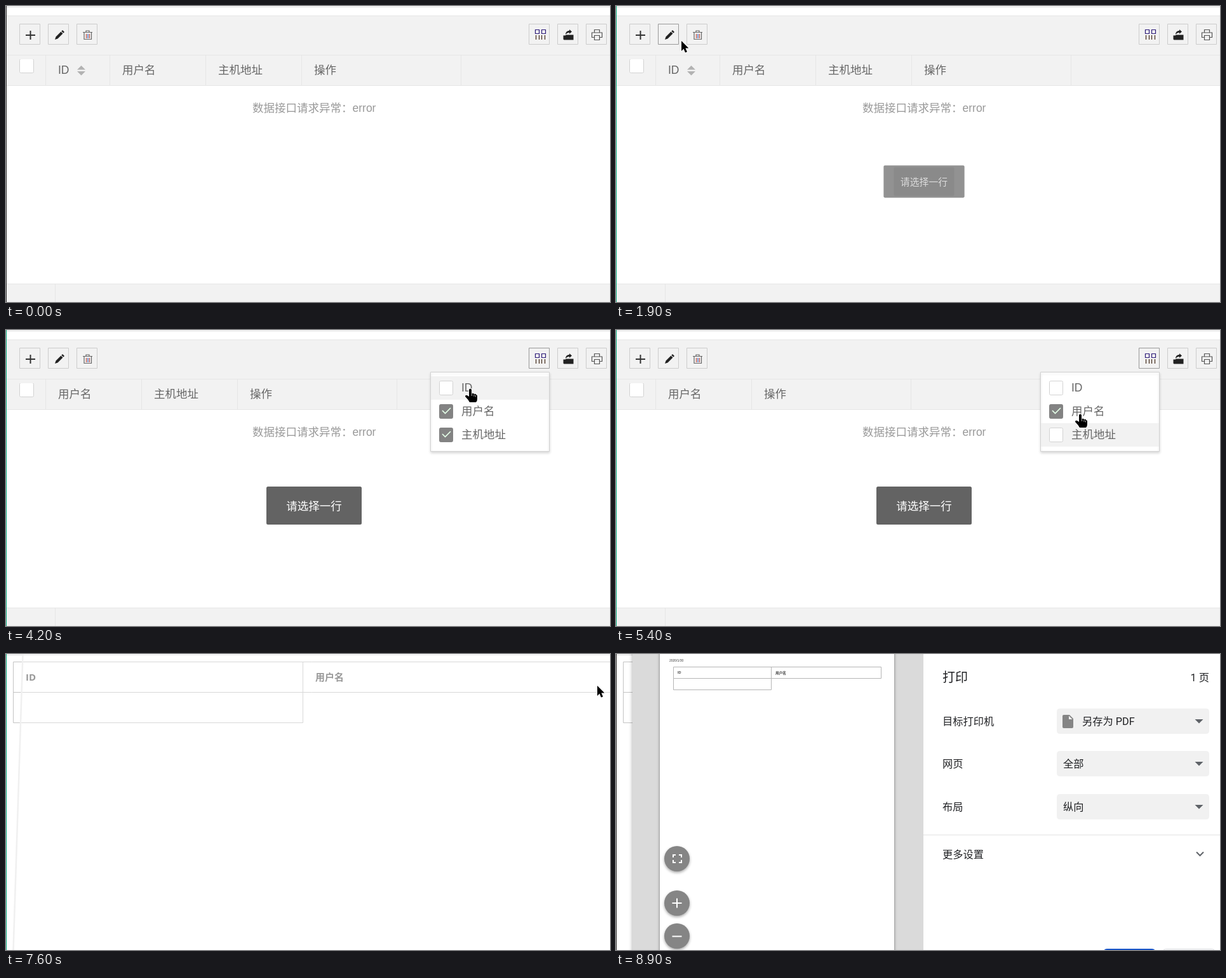
Recreate the animation shown at these times as an HTML page with a canvas. Size 951 by 467 pixels, loop 9.6 s.

```html
<!DOCTYPE html>
<html lang="zh-CN">
<head>
<meta charset="utf-8">
<style>
html, body { margin: 0; width: 100%; height: 100%; overflow: hidden; background: #fff; }
canvas { display: block; }
</style>
</head>
<body>
<canvas id="stage" width="951" height="467"></canvas>
<script>
const ctx = document.getElementById('stage').getContext('2d');
const LOOP = 9600, STEP = 100;
const TABLE_FONT = '"Liberation Sans", "Noto Sans CJK SC", "Noto Sans CJK", sans-serif';
const DIALOG_FONT = 'Roboto, "Noto Sans CJK SC", "Noto Sans CJK", sans-serif';
const clamp = v => Math.min(1, Math.max(0, v));

function rect(x, y, w, h, color) {
  ctx.fillStyle = color;
  ctx.fillRect(x, y, w, h);
}
function box(x, y, w, h, fill, border, r = 0) {
  ctx.beginPath();
  ctx.roundRect(x + .5, y + .5, w - 1, h - 1, r);
  ctx.fillStyle = fill;
  ctx.fill();
  ctx.strokeStyle = border;
  ctx.lineWidth = 1;
  ctx.stroke();
}
function text(s, x, y, color, size = 17.5, { family = TABLE_FONT, weight = 400, align = 'left' } = {}) {
  ctx.font = `${weight} ${size}px ${family}`;
  ctx.textAlign = align;
  ctx.fillStyle = color;
  ctx.fillText(s, x, y);
}
function stroke(d, color, width = 1) {
  ctx.strokeStyle = color;
  ctx.lineWidth = width;
  ctx.stroke(new Path2D(d));
}
function fill(d, color) {
  ctx.fillStyle = color;
  ctx.fill(new Path2D(d));
}
function layer(alpha, draw) {
  ctx.save();
  ctx.globalAlpha = alpha;
  draw();
  ctx.restore();
}
function shadow(color, blur, y, draw) {
  ctx.save();
  Object.assign(ctx, { shadowColor: color, shadowBlur: blur, shadowOffsetY: y });
  draw();
  ctx.restore();
}

// Pointer: time, x, y
const path = [
  [200, 456, 300], [1100, 38, 45], [1500, 38, 48], [1700, 83, 48], [1800, 86, 50],
  [1900, 103, 55], [2100, 117, 54], [2200, 121, 53], [2500, 121, 53], [3100, 835, 48],
  [3200, 835, 47], [3400, 835, 47], [3900, 731, 92], [4400, 731, 92], [4700, 731, 160],
  [5300, 731, 160], [5400, 731, 132], [5700, 731, 92], [5900, 731, 92], [6300, 888, 40],
  [6900, 888, 40], [7200, 931, 50]
];
function pointerAt(t) {
  const i = path.findIndex(k => k[0] > t);
  if (i < 0) return path[path.length - 1].slice(1);
  if (i === 0) return [-99, -99];
  const [t0, x0, y0] = path[i - 1], [t1, x1, y1] = path[i];
  const p = (t - t0) / (t1 - t0), e = p * p * (3 - 2 * p);
  return [x0 + (x1 - x0) * e, y0 + (y1 - y0) * e];
}

const menuOpen = t => t >= 3200 && t < 6200;
const columns = [
  { name: 'ID', width: 101, shown: t => t < 4200 || t >= 5800 },
  { name: '用户名', width: 151, shown: () => true },
  { name: '主机地址', width: 151, shown: t => t < 4700 },
  { name: '操作', width: 251, shown: () => true }
];
const buttons = [21, 66, 111, 823, 868, 913];
const buttonAt = ([x, y]) => buttons.findIndex(b => x >= b && x < b + 33 && y >= 28 && y < 61);
const rowAt = ([x, y]) => x > 668 && x < 856 && y >= 73 && y < 184 ? Math.floor((y - 73) / 37) : -1;

function icons() {
  stroke('M38.5 39v14M31 46h15', '#333', 2);
  fill('M77 53l1.5-4.5 8-8 3 3-8 8zM87.3 39.7l1.7-1.7 3 3-1.7 1.7z', '#222');
  stroke('M121 41.5h15M126 41v-2h5v2M123 42v10.5h11.500V42', '#666', 1.2);
  stroke('M126.500 44v7M131.500 44v7', '#c0503c', 1.2);
  stroke('M129 44v7', '#3060c0', 1.2);
  stroke('M833.5 37.5h6v6h-6zM843.5 37.5h6v6h-6z', '#2c1a78', 1.2);
  stroke('M834.5 46v7M839.5 46v7M843.500 46v7M848.500 46v7', '#4a3424', 1.3);
  fill('M877.500 52.500v-6h3l1.5-1h11.500v8h-15z', '#222');
  fill('M881 45c0-4 3-6 6-6v-2l4 3.500-4 3.500v-2c-3 0-4 1-6 3z', '#222');
  stroke('M926.5 42v-4.5h8v4.5M926 49.500h-3.5v-7.500h16v7.500H935M926.5 46.5h8v7h-8z', '#555', 1.2);
}

function table(t) {
  const before = pointerAt(t - STEP), hover = buttonAt(before);
  rect(1, 15, 950, 111, '#f2f2f2');
  rect(1, 438, 950, 29, '#f2f2f2');
  for (const y of [15, 77, 125, 438]) rect(1, y, 950, 1, '#e6e6e6');
  rect(77, 438, 1, 29, '#e6e6e6');
  buttons.forEach((x, i) => {
    const active = i === hover || (i === 3 && menuOpen(t));
    box(x, 28, 33, 33, '#f2f2f2', active ? '#999' : '#ccc');
  });
  icons();

  ctx.save();
  ctx.beginPath();
  ctx.rect(20, 84, 26, 30);
  ctx.clip();
  box(21, 83, 23, 23, '#fff', '#d2d2d2', 2);
  ctx.restore();

  let x = 62;
  rect(x, 78, 1, 47, '#e6e6e6');
  for (const { name, width, shown } of columns) {
    if (!shown(t)) continue;
    text(name, x + 20, 107, '#666');
    if (name === 'ID') fill(`M${x + 50} 100.500h13l-6.500-6.500zM${x + 50} 103h13l-6.500 6.500z`, '#b2b2b2');
    x += width;
    rect(x, 78, 1, 47, '#e6e6e6');
  }
  text('数据接口请求异常：error', 388, 167, '#999');
  if (menuOpen(t)) menu(t, rowAt(before));
}

function menu(t, hoverRow) {
  shadow('rgba(0,0,0,.14)', 4, 2, () => box(668, 66, 188, 126, '#fff', '#d2d2d2'));
  columns.slice(0, 3).forEach(({ name, shown }, i) => {
    const y = 73 + i * 37;
    if (i === hoverRow) rect(669, y, 186, 37, '#f2f2f2');
    if (shown(t)) {
      box(682, y + 7, 22, 23, '#838383', '#838383', 2);
      stroke(`M687 ${y + 17}l4.500 4.500 8.500-8.500`, '#e4ffe8', 1.7);
    } else box(682, y + 7, 22, 23, '#fff', '#d2d2d2', 2);
    text(name, 717, y + 24, '#666');
  });
}

const toasts = [
  { start: 1250, end: 1740, label: '添加', width: 125 },
  { start: 1765, end: 2500, label: '请选择一行', width: 150 },
  { start: 2520, end: 5560, label: '请选择一行', width: 150 }
];
function toast({ start, end, label, width }, t) {
  if (t < start || t > end + 200) return;
  const grow = 1 - (1 - clamp((t - start) / 300)) ** 2;
  const leave = clamp((t - end) / 200);
  const scale = (.5 + .5 * grow) * (1 - .3 * leave);
  layer(grow * (1 - leave) ** 1.5, () => {
    ctx.translate(485, 277);
    ctx.scale(scale, scale);
    ctx.beginPath();
    ctx.roundRect(-width / 2, -30, width, 60, 2.5);
    ctx.fillStyle = 'rgba(0,0,0,.61)';
    ctx.fill();
    text(label, 0, 6.5, '#fff', 17.5, { align: 'center' });
  });
}

function printPage() {
  stroke('M951 12.5H11.5v96h456v-96M11.5 60.5H951', '#c4c4c4');
  const bold = { weight: 700, family: DIALOG_FONT.replace('Roboto', '"Open Sans"') };
  text('ID', 31, 42, '#666', 15, bold);
  text('用户名', 487, 42, '#666', 15, bold);
}

function preview(t) {
  const step = (t - 8600) / 300;
  if (step <= 0) {
    if (t >= 8000) text('正在加载预览…', 255, 240, '#5f6368', 16.25, { family: DIALOG_FONT, align: 'center' });
    return;
  }
  layer(clamp(step), () => {
    shadow('rgba(0,0,0,.5)', 4, 0, () => rect(69, -5, 369, 480, '#fff'));
    text('2020/1/30', 84, 12, '#333', 5);
    stroke('M90.5 20.5h327v18h-327zM244.5 20.5v36h-154v-18', '#b5b5b5');
    text('ID', 97, 31, '#444', 5.5, { weight: 700 });
    text('用户名', 251, 31.5, '#444', 5.7, { weight: 700 });
  });
  layer(clamp(step) ** 1.8, () => {
    for (const y of [323, 393, 445]) {
      shadow('rgba(0,0,0,.35)', 4, 2, () => {
        ctx.beginPath();
        ctx.arc(96, y, 20, 0, 7);
        ctx.fillStyle = '#858585';
        ctx.fill();
      });
    }
    stroke('M90 321v-4h4M99 317h4v4M103 325v4h-4M94 329h-4v-4M88.500 393h15M96 385.500v15M88.500 445.500h15', '#fff', 2);
  });
}

function settings(t) {
  const ink = '#202124';
  const say = (s, x, y, size = 16.25, align = 'left') => text(s, x, y, ink, size, { family: DIALOG_FONT, align });
  say('打印', 514, 44, 20);
  say('1 页', 934, 43, 16.25, 'right');
  [['目标打印机', '另存为 PDF', 86], ['网页', '全部', 153], ['布局', '纵向', 221]].forEach(([label, value, y], i) => {
    say(label, 514, y + 25.5);
    box(694, y, 240, 40, '#f1f1f1', '#f1f1f1', 4);
    say(value, i ? 704 : 734, y + 26);
    fill(`M911.500 ${y + 17}h13l-6.500 6.500z`, '#5f6368');
  });
  fill('M705 96h9l6 6v13q0 2-2 2h-13q-2 0-2-2v-17q0-2 2-2z', '#858585');
  fill('M713 97.500v5.500h5.500z', '#f1f1f1');
  rect(484, 285, 467, 1, '#e3e3e3');
  say('更多设置', 514, 322);
  stroke('M914 312.500l5.500 5.500 5.500-5.500', '#5f6368', 2);
  if (t < 8900) box(766, 463, 85, 20, '#a8c7fa', '#a8c7fa', 5);
  box(768, 465, 81, 20, '#1a56c8', '#1a56c8', 4);
  box(861, 465, 82, 20, '#fff', '#dadce0', 4);
}

function dialog(t) {
  if (t < 7700) {
    layer(.33, () => fill('M26 0H951V467H11z', '#fff'));
    stroke('M26.500 0L11.500 467', '#f0f0f0', 2.500);
    return;
  }
  shadow('rgba(0,0,0,.35)', 6, 0, () => rect(26, -10, 940, 490, '#fff'));
  rect(26, 0, 458, 467, '#dadada');
  ctx.save();
  ctx.beginPath();
  ctx.rect(26, 0, 458, 467);
  ctx.clip();
  preview(t);
  ctx.restore();
  if (t >= 8000) settings(t);
}

function pointer(x, y, hand) {
  ctx.save();
  ctx.translate(Math.round(x), Math.round(y));
  ctx.lineJoin = 'round';
  const shape = hand
    ? 'M-2 2q2-3 4 0v6q3-1 4 1q3-1 3 1q2 0 2 2v5q0 3-2 5h-10q-2-4-7-9q0-3 3-2l3 2z'
    : 'M0 0v16l3.500-3.500 2.500 6 3-1.200-2.600-5.800h5z';
  stroke(shape, '#fff', 2);
  fill(shape, '#000');
  if (hand) stroke('M2.500 8v4M6 9.500v3.500M8.500 11v2.500', '#fff', .7);
  ctx.restore();
}

function draw(t) {
  rect(0, 0, 951, 467, '#fff');
  rect(1, 1, 950, 1, '#ddd');
  const printing = t >= 7300;
  if (printing) printPage();
  else {
    table(t);
    toasts.forEach(item => toast(item, t));
  }
  if (t >= 7600) dialog(t);
  rect(0, 0, 1, 467, t < 200 || t >= 8900 ? '#333' : '#0bb083');
  if (t >= 200 && t < 7700) {
    const at = pointerAt(t);
    const hand = !printing && (buttonAt(at) >= 0 || (menuOpen(t) && rowAt(at) >= 0));
    pointer(...at, hand);
  }
}

function tick() {
  draw(Math.floor(performance.now() % LOOP / STEP) * STEP);
  requestAnimationFrame(tick);
}
tick();
</script>
</body>
</html>
```
